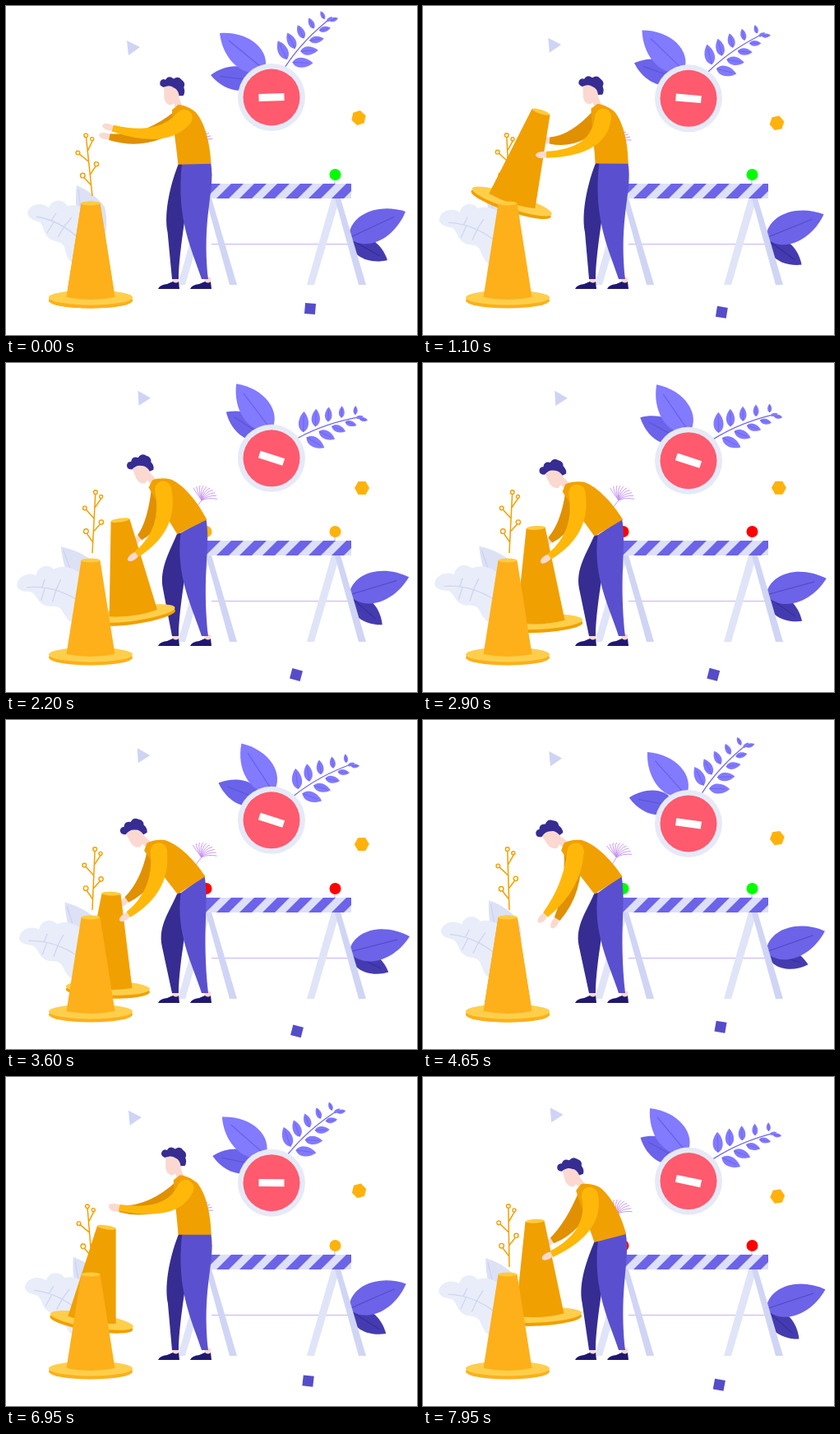
An HTML page with a canvas that plays this animation: 500x400 px, repeating every 8000 ms.

```html
<!DOCTYPE html>
<html lang="en">
<head>
<meta charset="utf-8">
<style>
html, body { margin: 0; width: 100%; height: 100%; overflow: hidden; background: #fff; }
canvas { display: block; }
</style>
</head>
<body>
<canvas id="stage" width="500" height="400"></canvas>
<script>
const ctx = document.getElementById('stage').getContext('2d');
const LOOP = 8000, SWING = 6400, RAD = Math.PI / 180;
const TIMES = [0, 1100, 1550, 2200, 3600, 4650, 5850];

// One value per entry of TIMES; the pose repeats every SWING ms.
const tracks = {
  drift: [0, .39, .57, 1, .94, .47, .06],
  plant: [0, .46, .5, 1, .75, .3, .05],
  bar: [-2, 5, 12, 18, 18, 8, -1],
  bigLeaf: [0, 4.6, 11, 13.6, 17.5, 9, -2.8],
  smallLeaf: [0, 13, 22, 25.5, 15, 3.5, 2],
  branch: [0, 12.4, 24, 28.4, 18.4, -.3, -7.5],
  darkLeaf: [0, 7, 12.5, 12, -3, -13.5, -11],
  lean: [15, 13, 28, 40, 46, 46, 32],
  nod: [2, 3, 18, 24, 30, 36, 6],
  coneX: [103, 108, 142, 155, 124, 103, 103],
  coneY: [355, 238, 290, 305, 326, 355, 355],
  coneTilt: [0, 18, -3, -8, 2, 0, 0],
  handX: [124, 144, 151, 154, 144, 145, 145],
  handY: [147, 181, 218, 236, 240, 241, 215],
  elbowX: [190, 214, 211, 200, 190, 181, 200],
  elbowY: [166, 178, 188, 203, 208, 203, 185],
  backHandX: [120, 148, 152, 158, 142, 160, 127],
  backHandY: [158, 163, 202, 216, 222, 247, 207],
  backElbowX: [172, 185, 183, 182, 174, 184, 182],
  backElbowY: [168, 166, 182, 196, 199, 208, 182]
};

// Smooth periodic interpolation that never overshoots its keys.
function sample(keys, time) {
  const n = TIMES.length, t = time % SWING;
  const at = i => TIMES[(i + n) % n] + SWING * Math.floor(i / n);
  const val = i => keys[(i + n) % n];
  const slope = i => (val(i + 1) - val(i)) / (at(i + 1) - at(i));
  const tangent = i => {
    const a = slope(i - 1), b = slope(i);
    return a * b <= 0 ? 0 : 2 * a * b / (a + b);
  };
  let i = n - 1;
  while (TIMES[i] > t) i--;
  const d = at(i + 1) - at(i), u = (t - at(i)) / d, v = 1 - u;
  return val(i) * (1 + 2 * u) * v * v + tangent(i) * d * u * v * v
    + val(i + 1) * u * u * (3 - 2 * u) - tangent(i + 1) * d * u * u * v;
}

function placed(x, y, degrees, draw) {
  ctx.save();
  ctx.translate(x, y);
  ctx.rotate(degrees * RAD);
  draw();
  ctx.restore();
}

const fill = (d, color) => { ctx.fillStyle = color; ctx.fill(new Path2D(d)); };

function stroke(d, color, width = 1) {
  ctx.strokeStyle = color;
  ctx.lineWidth = width;
  ctx.stroke(new Path2D(d));
}

function oval(x, y, rx, ry, color, degrees = 0) {
  ctx.beginPath();
  ctx.ellipse(x, y, rx, ry, degrees * RAD, 0, 7);
  ctx.fillStyle = color;
  ctx.fill();
}

const disc = (x, y, r, color) => oval(x, y, r, r, color);

function leaf(x, y, tipX, tipY, width, color, rib) {
  const length = Math.hypot(tipX - x, tipY - y), h = width * .67;
  placed(x, y, Math.atan2(tipY - y, tipX - x) / RAD, () => {
    fill(`M0 0C${length * .15} ${-h} ${length * .65} ${-h} ${length} 0C${length * .65} ${h} ${length * .15} ${h} 0 0Z`, color);
    if (rib) stroke(`M0 0L${length * .8} 0`, rib);
  });
}

function drawSign(p, time) {
  const y = 120 - 9 * Math.cos(2 * Math.PI * time / 12800);
  placed(323, y, p.smallLeaf, () => leaf(-17, -20, -74, -27, 29, '#6b63ea', '#5a51d2'));
  placed(323, y, p.bigLeaf, () => leaf(-8, -33, -63, -78, 36, '#827aff', '#655ce4'));
  placed(323, y, p.branch, () => {
    stroke('M16 -36Q38 -70 73 -97', '#7168e8', 1.3);
    for (let i = 0; i < 5; i++) {
      const u = .1 + i * .2, x = 16 + 44 * u + 13 * u * u, yy = -36 - 68 * u + 7 * u * u;
      const size = 25 - i * 3.6;
      for (const side of [-1, 1]) {
        const angle = (side < 0 ? -116 : 2 - i * 5) * RAD;
        const c = Math.cos(angle), s = Math.sin(angle);
        const gap = side < 0 ? 4 : 5;
        leaf(x + c * gap, yy + s * gap, x + c * (gap + size), yy + s * (gap + size), size * .48, '#827aff', '#6e65ea');
      }
    }
    leaf(67, -92, 74, -98, 4, '#827aff');
  });
  disc(323, y, 41, '#e6eaf7');
  disc(323, y, 34.5, '#ff5a6e');
  placed(323, y, p.bar, () => fill('M-15.5 -4.5H15.5V4.5H-15.5Z', '#fff'));
}

function drawScraps(p) {
  const s = p.drift;
  placed(153 + 13 * s, 51 - 8 * s, 3 * s, () => fill('M-6 -9L10 -1L-4 9Z', '#cfd3f5'));
  placed(429 + 4 * s, 136 + 16 * s, 18 * s - 18, () =>
    fill('M-9 0L-4.5 -8H4.5L9 0L4.5 8H-4.5Z', '#ffb20c'));
  placed(370 - 17 * s, 368 + 11 * s, 5 + 10 * s, () => fill('M-6.5 -6.5H6.5V6.5H-6.5Z', '#554cc9'));
}

function drawRightLeaves(p) {
  placed(417, 284, p.darkLeaf, () => leaf(2, 0, 47, 25, 25, '#453bb0', '#342b94'));
  placed(417, 284, p.bigLeaf * .6, () => leaf(0, -2, 69, -34, 37, '#6c63e8', '#5048c0'));
}

function drawPalePlants(p) {
  placed(100, 305, -13 * p.plant, () => {
    fill('M-14 -87C2 -80 12 -71 20 -61C25 -40 22 -15 8 5C-10 -20 -18 -55 -14 -87Z', '#dce1f5');
    stroke('M-12 -82Q-8 -40 5 0', '#c8cef0');
  });
  placed(95, 310, -15 * p.plant, () => {
    fill('M-69 -58C-67 -70 -51 -72 -43 -65C-38 -76 -26 -76 -20 -67C-8 -70 5 -62 12 -50L22 -25L5 2H-14C-20 0 -22 -10 -24 -17C-28 -26 -38 -22 -44 -29C-49 -33 -49 -43 -54 -47C-60 -50 -67 -50 -69 -58Z', '#e9edf9');
    stroke('M-58 -54Q-22 -48 5 -15M-37 -47L-45 -34M-24 -42L-32 -29M-40 -49L-34 -58M-24 -42L-15 -53', '#cfd5f2', 1.3);
  });
}

function drawSprig(p) {
  placed(105, 231, 9 * p.drift - 6, () => {
    const orange = '#f2a000';
    stroke('M0 0Q0 -35 0 -72M0 -55L8 -68M0 -42L-11 -53M0 -26L9 -37M0 -13L-9 -25', orange, 1.5);
    for (const [x, y, r] of [[0, -74, 2.3], [7, -69, 2], [-12, -54, 2.3], [9, -38, 2.6], [-9, -26, 2.8]]) {
      disc(x, y, r + .7, orange);
      disc(x, y, r - .7, '#fff');
    }
  });
}

function drawDandelion(p) {
  placed(233 + 5 * p.drift, 167, 12 * p.drift - 12, () => {
    let d = 'M-10 13L0 0';
    for (let i = 0; i < 10; i++) {
      const a = (-122 + i * 13) * RAD, c = Math.cos(a), s = Math.sin(a);
      d += `M0 0Q${c * 11 - 3} ${s * 11 - 3} ${c * 19} ${s * 18}`;
    }
    stroke(d, '#c690f2', .9);
  });
}

function drawBarrier(time) {
  const lamp = ['#00ff00', '#ffb20c', '#ff0000'][Math.floor(time / (12800 / 9)) % 3];
  stroke('M250 289.5H418', '#c9b2f6', 1.2);
  for (const x of [0, 157]) {
    fill(`M${239 + x} 234H${249 + x}L${218 + x} 339H${209 + x}Z`, '#e0e4f8');
    fill(`M${243 + x} 234H${250 + x}L${281 + x} 339H${272 + x}Z`, '#d0d5f5');
    stroke(`M${243 + x} 210V217`, '#c9cdf0', 1.5);
    disc(243.5 + x, 205, 7, lamp);
  }
  ctx.save();
  ctx.beginPath();
  ctx.rect(242, 216, 178, 18);
  ctx.clip();
  fill('M242 216H420V234H242Z', '#6c63e8');
  for (let x = 243; x < 420; x += 28) fill(`M${x} 234H${x + 13}L${x + 31} 216H${x + 18}Z`, '#dde0f8');
  ctx.restore();
}

function drawCone(x, y, tilt, color) {
  placed(x, y, tilt, () => {
    oval(0, 3, 51, 9.5, color);
    oval(0, -.5, 51, 9, '#ffcf4c');
    fill('M-11.5 -115L-29.5 -1Q0 5 29.5 -1L11.5 -115Z', color);
    oval(0, -115, 11.5, 2.4, '#ffcb3e');
  });
}

function drawArm([sx, sy], ex, ey, hx, hy, color) {
  const aim = Math.atan2(hy - ey, hx - ex), c = Math.cos(aim), s = Math.sin(aim);
  const start = Math.atan2(ey - sy, ex - sx), nx = -Math.sin(start), ny = Math.cos(start);
  const wx = hx - c * 6, wy = hy - s * 6, r = 10;
  oval(hx - c, hy - s, 8, 4, '#fbd9d0', aim / RAD);
  disc(sx, sy, r, color);
  fill(`M${sx + nx * r} ${sy + ny * r}Q${ex + nx * 8 - s * 3} ${ey + ny * 8 + c * 3} ${wx - s * 4} ${wy + c * 4}`
    + `L${wx + s * 4} ${wy - c * 4}Q${ex - nx * 10 + s * 3} ${ey - ny * 10 - c * 3} ${sx - nx * r} ${sy - ny * r}Z`, color);
}

function drawHead() {
  fill('M-9 -11L-9.5 3Q-8 11 -2 12L2 10L4 16L13 15L9 4V-10Z', '#fbd9d0');
  fill('M-10 -10Q-16 -13 -13 -18Q-10 -21 -7 -19Q-3 -25 3 -20Q9 -24 13 -18Q18 -14 15 -9Q17 -3 14 1H9Q8 -7 3 -9Q-2 -13 -10 -10Z', '#362c92');
}

function drawMan(p) {
  const bend = p.lean - 13, sin = Math.sin(p.lean * RAD), cos = Math.cos(p.lean * RAD);
  const neckX = 229 - .13 * bend - 72 * sin, neckY = 191 + .3 * bend - 72 * cos;
  const onTorso = (x, y) => [neckX + x * cos + y * sin, neckY - x * sin + y * cos];
  const [ax, ay] = onTorso(-18, 67), [bx, by] = onTorso(20, 76);
  const knee = 194 - bend * .22;

  for (const x of [0, 39]) {
    fill(`M${202 + x} 330H${210 + x}V337H${203 + x}Z`, '#fbd9d0');
    fill(`M${185 + x} 344Q${187 + x} 339 ${196 + x} 338L${203 + x} 335Q${207 + x} 338 ${210 + x} 335L${211 + x} 344Z`, '#201870');
  }
  fill(`M${ax} ${ay}C${ax - 9} ${ay + 22} ${knee - 2} 250 ${knee + 3} 275L202 332H210C210 305 218 255 ${ax + 18} ${ay}Z`, '#362c92');
  fill(`M${ax + 4} ${ay}L${bx} ${by}C${bx + 6} ${by + 35} 238 255 246 332H238C228 300 206 260 ${ax + 4} ${ay}Z`, '#5a50cf');

  drawArm(onTorso(-1, 13), p.backElbowX, p.backElbowY, p.backHandX, p.backHandY, '#e09000');
  const toHead = (30 + p.nod) * RAD;
  placed(neckX - 16 * Math.sin(toHead), neckY - 16 * Math.cos(toHead), -p.nod, drawHead);
  placed(neckX, neckY, -p.lean, () =>
    fill('M-9 2C-13 20 -15 45 -19 68L20 77.5C25 55 26 28 18 12C13 5 6 0 0 -2Z', '#f0a000'));
  return onTorso(3, 15);
}

function render(time) {
  const p = {};
  for (const name in tracks) p[name] = sample(tracks[name], time);
  ctx.fillStyle = '#fff';
  ctx.fillRect(0, 0, 500, 400);
  drawSign(p, time);
  drawScraps(p);
  drawRightLeaves(p);
  drawPalePlants(p);
  drawSprig(p);
  drawBarrier(time);
  drawDandelion(p);
  const shoulder = drawMan(p);
  drawCone(p.coneX, p.coneY, p.coneTilt, '#f0a000');
  drawCone(103, 355, 0, '#fdb01a');
  drawArm(shoulder, p.elbowX, p.elbowY, p.handX, p.handY, '#ffb80a');
}

const began = performance.now();
function tick() {
  render((performance.now() - began) % LOOP);
  requestAnimationFrame(tick);
}
tick();
</script>
</body>
</html>
```
